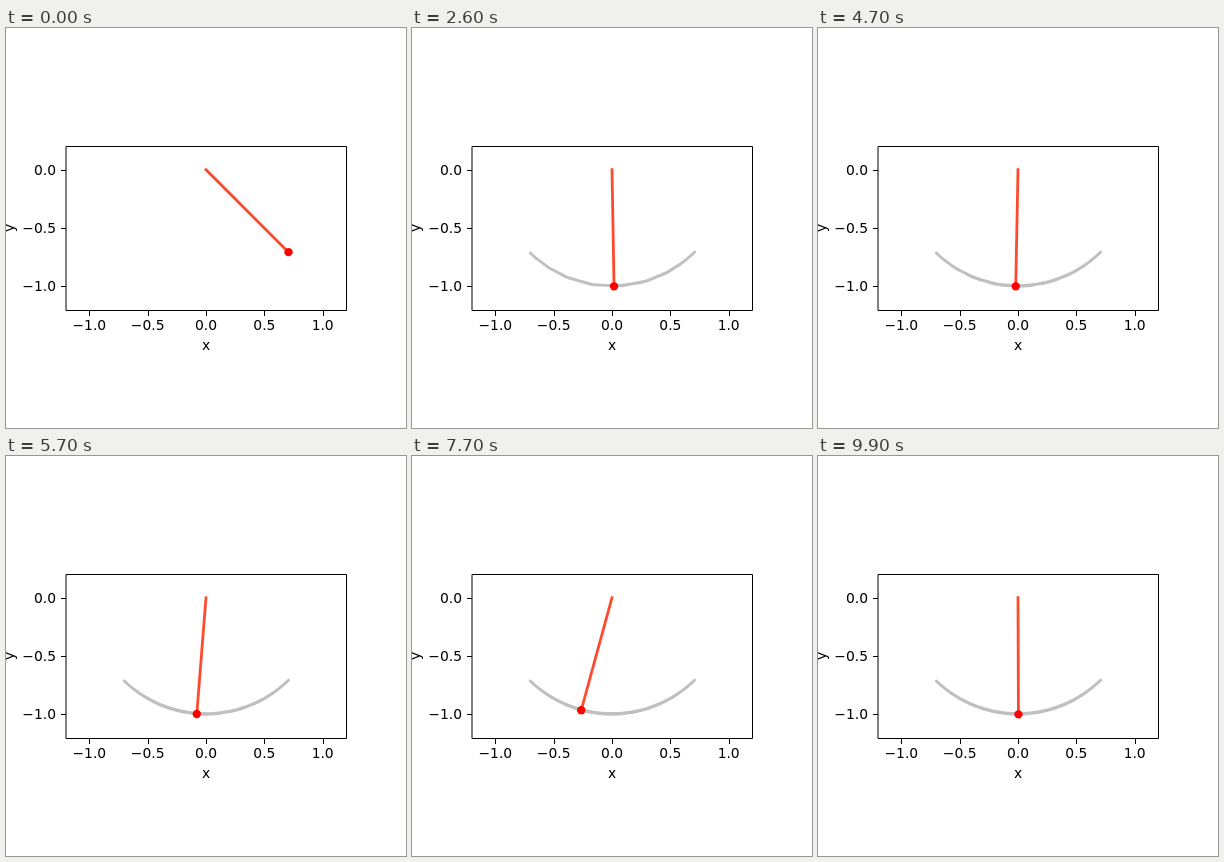
These frames come from a looping animation (400 by 400 pixels, 10 s). An HTML page with a canvas:

```html
<!DOCTYPE html>
<html lang="en">
<head>
<meta charset="utf-8">
<title>Pendulum</title>
<style>
html, body { margin: 0; width: 100%; height: 100%; overflow: hidden; background: #fff; }
canvas { display: block; width: 400px; height: 400px; }
</style>
</head>
<body>
<canvas id="stage" width="400" height="400"></canvas>
<script>
const ctx = document.getElementById('stage').getContext('2d');
const UNIT = 280 / 2.4;
const ORIGIN = { x: 200, y: 118.333 + 0.2 * UNIT };
const LINE = 2.78;
const FRAME = 100, COUNT = 100;

const px = x => ORIGIN.x + x * UNIT;
const py = y => ORIGIN.y - y * UNIT;

// Lightly damped pendulum, sampled every 0.1 s
function swing() {
  const g = 9.81, drag = 0.0059, sub = 100, dt = 0.1 / sub;
  const acc = (a, v) => -g * Math.sin(a) - drag * v;
  const points = [];
  let a = Math.PI / 4, v = 0;
  for (let i = 0; i < COUNT; i++) {
    points.push({ x: px(Math.sin(a)), y: py(-Math.cos(a)) });
    for (let k = 0; k < sub; k++) {
      const vm = v + acc(a, v) * dt / 2;
      const am = a + v * dt / 2;
      a += vm * dt;
      v += acc(am, vm) * dt;
    }
  }
  return points;
}
const path = swing();

function polyline(points, color) {
  ctx.strokeStyle = color;
  ctx.lineWidth = LINE;
  ctx.lineCap = 'square';
  ctx.lineJoin = 'round';
  ctx.beginPath();
  points.forEach(p => ctx.lineTo(p.x, p.y));
  ctx.stroke();
}

function label(v) {
  return (v < 0 ? '\u2212' : '') + Math.abs(v).toFixed(1);
}

function axes() {
  ctx.strokeStyle = '#000';
  ctx.lineWidth = 1;
  ctx.strokeRect(60.5, 118.5, 280, 164);

  ctx.fillStyle = '#000';
  ctx.font = '13.89px "DejaVu Sans", sans-serif';
  ctx.textBaseline = 'alphabetic';
  ctx.textAlign = 'center';
  for (const v of [-1, -0.5, 0, 0.5, 1]) {
    ctx.fillRect(Math.round(px(v)), 283, 1, 5);
    ctx.fillText(label(v), px(v), 302);
  }
  ctx.fillText('x', 200, 322);

  ctx.textAlign = 'right';
  for (const v of [0, -0.5, -1]) {
    const y = Math.round(py(v));
    ctx.fillRect(55, y, 5, 1);
    ctx.fillText(label(v), 50, y + 5);
  }

  ctx.save();
  ctx.translate(8, 200);
  ctx.rotate(-Math.PI / 2);
  ctx.textAlign = 'center';
  ctx.fillText('y', 0, 0);
  ctx.restore();
}

function draw(i) {
  ctx.fillStyle = '#fff';
  ctx.fillRect(0, 0, 400, 400);
  const bob = path[i];
  if (i > 0) polyline(path.slice(0, i + 1), '#c0c0c0');
  polyline([ORIGIN, bob], '#fd4a2c');
  ctx.fillStyle = '#f00';
  ctx.beginPath();
  ctx.arc(bob.x, bob.y, 4.17, 0, Math.PI * 2);
  ctx.fill();
  axes();
}

const start = performance.now();
function tick() {
  const t = Math.max(0, performance.now() - start);
  draw(Math.floor(t / FRAME) % COUNT);
  requestAnimationFrame(tick);
}
tick();
</script>
</body>
</html>
```
